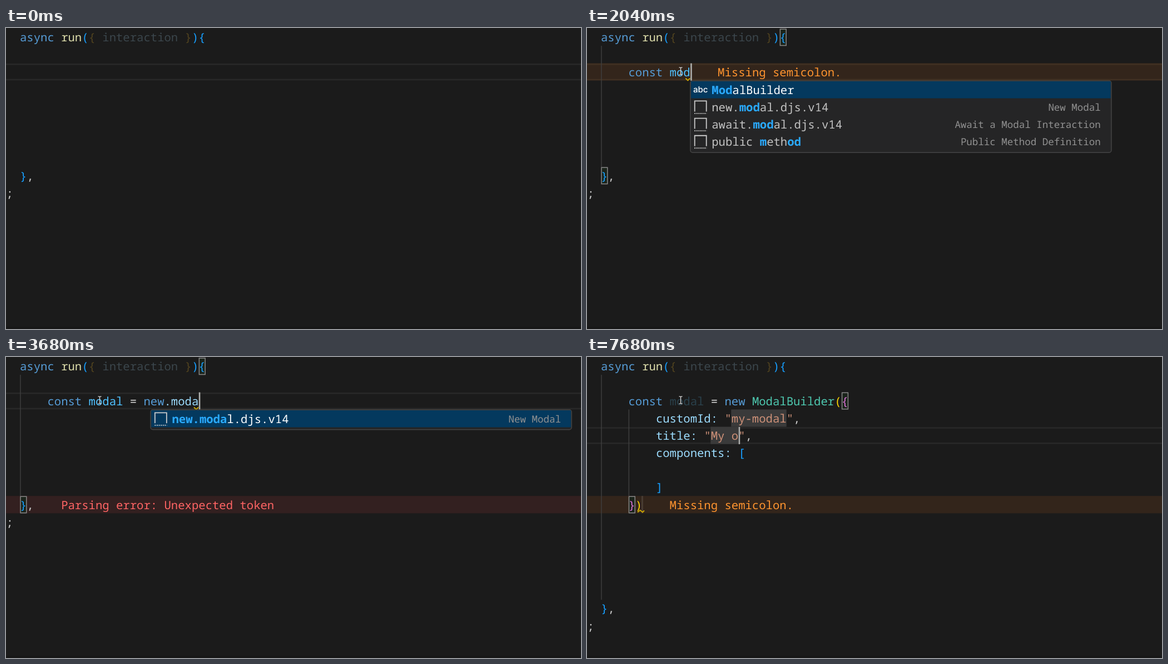
An HTML page for the animation above (8 s loop, 1034x542 px).

```html
<!DOCTYPE html>
<html lang="en">
<head>
<meta charset="utf-8">
<title>Typing in a code editor</title>
<style>
html, body { margin: 0; width: 100%; height: 100%; overflow: hidden; background: #1b1b1b; }
svg { display: block; width: 100%; height: 100%; }
text { font: 20.6px "Noto Sans Mono", monospace; white-space: pre; text-rendering: geometricPrecision; }
.note { font-size: 17.5px; text-anchor: end; fill: #919191; }
.abc { font: 500 15px Inter, sans-serif; text-anchor: middle; fill: #fff; }
.hit { font-weight: 700; fill: #2aaaff; }
.icon { fill: none; stroke-width: 1.8; }
</style>
</head>
<body>
<svg id="stage" viewBox="0 0 1034 542"></svg>
<script>
const LOOP = 8000, CW = 12.36, RH = 31.15;
const C = {
  blue: '#569cd6', fn: '#dcdcaa', b1: '#179fff', b2: '#da70d6', gold: '#ffd700',
  dimGold: '#51431f', dim: '#3b464c', text: '#cccccc', name: '#9cdcfe', konst: '#4fc1ff',
  type: '#4ec9b0', str: '#ce9178', warn: '#ff942f', error: '#ff6464'
};
const stage = document.getElementById('stage');
const X = col => 25 + CW * col;
const Y = row => 1 + RH * row;
const within = (t, a, b) => t >= a && t < b;
const typed = (word, times, t) => word.slice(0, times.filter(k => k <= t).length);

const rect = (x, y, w, h, fill) => `<rect x="${x}" y="${y}" width="${w}" height="${h}" fill="${fill}"/>`;
const span = (s, fill) => `<tspan fill="${fill}">${s}</tspan>`;
// parts alternate: text, colour, text, colour
function line(row, col, ...parts) {
  let s = '';
  for (let i = 0; i < parts.length; i += 2) s += span(parts[i], parts[i + 1]);
  return `<text x="${X(col)}" y="${Y(row) + 23.3}">${s}</text>`;
}
const band = (row, fill) => rect(0, Y(row), 1034, RH, fill);
const edges = (row, fill) => rect(0, Y(row) + 0.7, 1034, 2.6, fill) + rect(0, Y(row) + 28.4, 1034, 2.6, fill);
const caret = (row, col) => rect(X(col) + 0.4, Y(row) + 0.3, 2.6, RH, '#aeafad');
const guide = (col, from, to) => rect(X(col) + 0.2, Y(from), 1.4, Y(to) - Y(from), '#404040');
const bracket = (row, col) =>
  `<rect x="${X(col) + 1}" y="${Y(row) + 1}" width="10.8" height="29.5" fill="#1b241b" stroke="#888" stroke-width="1.5"/>`;
const slot = (row, col, n) => rect(X(col) - 0.6, Y(row), n ? n * CW + 0.6 : 3.4, RH, '#3a3a3a');
const wave = (x, y, d) => `<path d="M${x} ${y}${d}" class="icon" stroke="#cca700"/>`;

const CUBE = 'M-11-4L2-10L11-6V4L-2 10L-11 6ZM-11-4L-2 0L11-6M-2 0V10';
const ICONS = {
  field: c => `<path d="${CUBE}" stroke="${c || '#75beff'}"/>`,
  variable: c => `<g stroke="${c || '#75beff'}"><path d="M-8-7h-4v14h4M8-7h4v14h-4"/>
    <path d="${CUBE}" transform="scale(.56)" stroke-width="3.2"/></g>`,
  keyword: () => '<path stroke="#ccc" d="M-12-9h11v4h-11zM3-7h9M-12 1h5M-4 1h16M-12 5h13M5 5h4M-12 9h9M0 9h12"/>',
  snippet: () => '<path stroke="#ccc" d="M-10.5 8V-11H10.5V8"/><path stroke="#ccc" stroke-dasharray="2 1.6" d="M-11 11.5H11"/>',
  word: () => '<text class="abc" y="5">abc</text>'
};

const item = s => { const [kind, label, note = ''] = s.split('|'); return { kind, label, note }; };
const LISTS = {
  c: ['keyword|const', 'field|customId?', 'field|cooldown?', 'keyword|case', 'keyword|catch', 'keyword|class',
    'variable|console', 'keyword|continue', 'variable|confirm', 'variable|crypto',
    'snippet|const.command|Command constant', 'snippet|component|Component'].map(item),
  m: ['word|ModalBuilder', 'snippet|new.modal.djs.v14|New Modal',
    'snippet|await.modal.djs.v14|Await a Modal Interaction', 'snippet|public method|Public Method Definition'].map(item),
  n: ['field|name', 'field|nameLocalizations?', 'field|nsfw?', 'variable|navigator', 'keyword|new', 'keyword|null',
    'variable|normalizeArray|discord.js', 'snippet|new.command|Slash Command',
    'snippet|new.command.message|Message Context Command', 'snippet|new.command.options|Slash Command with options',
    'snippet|new.command.user|User Context Command', 'snippet|new.component|Component',
    'snippet|new.modal.djs.v14|New Modal'].map(item)
};

// Positions of the query letters in order, or null when one is missing.
function match(label, query) {
  const low = label.toLowerCase(), at = [];
  let from = 0;
  for (const ch of query) {
    const i = low.indexOf(ch, from);
    if (i < 0) return null;
    at.push(i);
    from = i + 1;
  }
  return at;
}

function popup(list, query, col) {
  const px = X(col) + 0.2, py = 95;
  const first = i => i.label.startsWith(query) ? 0 : 1;
  const rows = list.filter(i => match(i.label, query));
  if (query.length > 1 && list === LISTS.n) rows.sort((a, b) => first(a) - first(b));
  rows.splice(12);
  let s = `<rect x="${px}" y="${py}" width="757" height="${rows.length * RH + 4.6}" rx="4" fill="#252526" stroke="#454545" stroke-width="1.5"/>`;
  rows.forEach((r, i) => {
    const top = py + 1 + i * RH, hits = match(r.label, query);
    if (!i) s += rect(px + 1.2, top, 754.6, RH - 0.6, '#04395e');
    const label = [...r.label].map((ch, k) => hits.includes(k) ? `<tspan class="hit">${ch}</tspan>` : ch).join('');
    s += `<g class="icon" transform="translate(${px + 18.3} ${top + 15.3})">${ICONS[r.kind](i ? '' : '#fff')}</g>
      <text x="${px + 38.4}" y="${top + 22.7}" fill="${i ? '#c2c2c2' : '#fff'}">${label}</text>
      <text class="note" x="${px + 738}" y="${top + 21.6}">${r.note}</text>`;
  });
  return s;
}

function mouse(t) {
  if (t < 80) return '';
  const u = Math.min(1, (Math.floor((t - 80) / 40) * 40) / 400);
  const k = 1 - (1 - u) ** 2;
  return `<path transform="translate(${970 - 801.5 * k} ${536 - 458.4 * k})" class="icon" stroke="#ddd" style="stroke-width:1.3"
    d="M-3-6.5H-1L0-5.5L1-6.5H3M0-5.5V5.5M-3 6.5H-1L0 5.5L1 6.5H3"/>`;
}

const header = () => line(0, 0, 'async ', C.blue, 'run', C.fn, '(', C.b1, '{', C.dimGold,
  ' interaction ', C.dim, '}', C.dimGold, '){', C.b1);
const closing = row => line(row, 0, '},', C.b1).replace('},', '}' + span(',', C.text)) + line(row + 1, -2, ';', C.text);

const STATEMENT = 'const modal = new.moda';
const KEYS = [1200, 1520, 1560, 1640, 1720, 1920, 1920, 2000, 2040, 2200, 2240, 2320, 2400, 2480,
  2760, 2840, 2920, 3360, 3440, 3480, 3640, 3680];

function typing(t) {
  const code = typed(STATEMENT, KEYS, t), n = code.length, end = 4 + n;
  const warn = within(t, 1240, 2400), fail = t >= 2560, ready = t >= 680;
  let s = warn ? band(2, '#33251b') : '';
  s += edges(2, warn ? '#403022' : '#282828');
  if (fail) s += band(8, '#332020');
  if (t >= 1200) s += guide(0, 1, 8);
  if (ready) s += bracket(0, 26) + bracket(8, 0);
  s += header() + closing(8);
  const tail = code.slice(14);
  s += line(2, 4, code.slice(0, 5), n < 5 ? C.name : C.blue, code.slice(5, 11), C.konst,
    code.slice(11, 14), '#d4d4d4', tail.slice(0, 3), tail.length > 2 ? C.blue : C.name, tail.slice(3), C.name);
  if (warn) s += line(2, end + 4, 'Missing semicolon.', C.warn);
  if (fail) s += line(8, 6, 'Parsing error: Unexpected token', C.error);
  if (warn || t >= 2760) s += wave(X(end - 1) + 4, 90.5, 'l4 4l4-4');
  if (within(t, 560, 1040) || t >= 1200) s += caret(2, end);
  if (within(t, 1320, 1720)) s += popup(LISTS.c, code, 5);
  if (within(t, 2040, 2320)) s += popup(LISTS.m, code.slice(6), 13);
  if (t >= 2760) s += popup(LISTS.n, tail, 19);
  return s;
}

function blackout() {
  return rect(0, 63.5, 1034, 478.5, '#000') + rect(801.5, 137, 232.5, 238.5, '#1b1b1b') +
    rect(801.5, Y(8), 232.5, RH, '#332020');
}

function filling(t) {
  const id = typed('my-modal', [4640, 4760, 5240, 5800, 5880, 6000, 6080, 6160], t);
  const title = typed('My o', [7160, 7360, 7480, 7680], t);
  const row = t < 6440 ? 3 : 4;
  const hidden = within(t, 4440, 4640) || within(t, 5720, 5800) || within(t, 6880, 7160);
  let s = band(8, '#33251b') + edges(row, '#282828') + guide(0, 1, 14) + guide(4, 3, 8);
  s += slot(3, 19, id.length) + slot(4, 16, title.length) + rect(X(6) - 1.2, Y(8), 3, RH, '#483c33');
  s += bracket(2, 35) + bracket(8, 4) + header() + closing(14);
  s += line(2, 4, 'const ', C.blue, 'modal', t < 4320 ? C.konst : '#2a414c', ' = ', '#d4d4d4', 'new ', C.blue,
    'ModalBuilder', C.type, '(', C.gold, '{', C.b2);
  s += line(3, 8, 'customId: ', C.name, `"${id}"`, C.str, ',', C.text);
  s += line(4, 8, 'title: ', C.name, `"${title}"`, C.str, ',', C.text);
  s += line(5, 8, 'components: ', C.name, '[', C.b1) + line(7, 8, ']', C.b1);
  s += line(8, 4, '}', C.b2, ')', C.gold);
  if (t >= 4360) s += line(8, 10, 'Missing semicolon.', C.warn) + wave(91, 279.5, 'l4.5-3.5l4.5 3.5l3-3');
  if (!hidden) s += row === 3 ? caret(3, 19 + id.length) : caret(4, 16 + title.length);
  return s;
}

let shown = '';
function draw(t) {
  let s = rect(0, 0, 1034, 542, '#1b1b1b') + rect(0, 538, 1034, 4, '#171717');
  s += t < 3920 ? typing(t) : filling(t);
  if (within(t, 3360, 3440)) s += blackout();
  s += mouse(t);
  if (s !== shown) stage.innerHTML = shown = s;
}

const start = performance.now();
function tick() {
  draw((performance.now() - start) % LOOP);
  requestAnimationFrame(tick);
}
tick();
</script>
</body>
</html>
```
